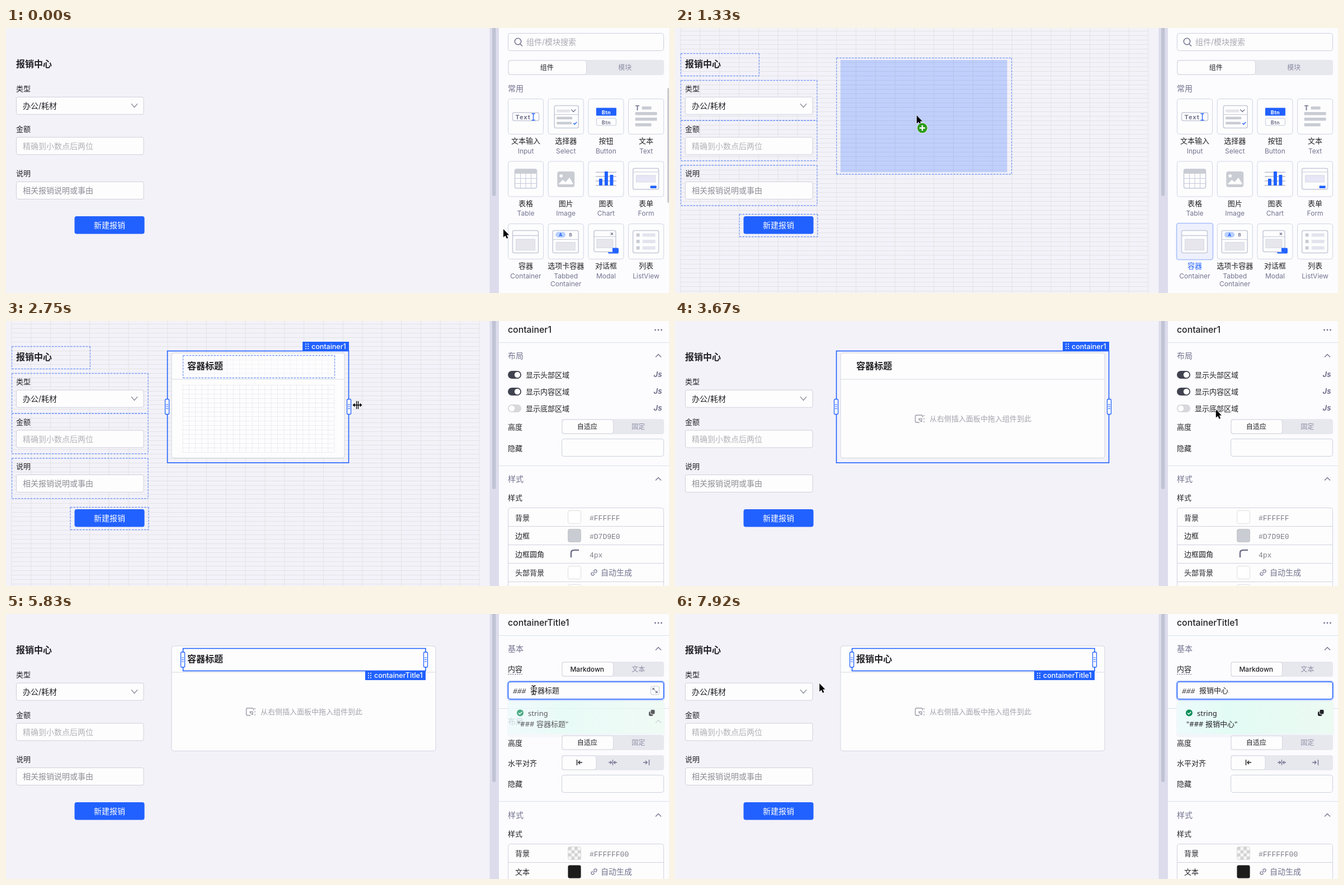
An HTML page for the animation above (8 s loop, 1185 px wide and 473 px high).

```html
<!DOCTYPE html>
<html lang="zh-CN">
<head>
<meta charset="utf-8">
<style>
html, body { margin: 0; width: 100%; height: 100%; overflow: hidden; background: #f3f2f9; }
svg { display: block; width: 1185px; height: 473px; }
text { font-family: Inter, "Noto Sans CJK SC", "Noto Sans CJK", sans-serif; white-space: pre; }
text.mono { font-family: "Liberation Mono", "Noto Sans CJK SC", "Noto Sans CJK", monospace; }
text.sans { font-family: "Noto Sans", "Noto Sans CJK SC", "Noto Sans CJK", sans-serif; }
</style>
</head>
<body>
<svg id="stage" viewBox="0 0 1185 473"></svg>
<script>
const BLUE = '#2161ff', INK = '#222226', SLATE = '#73738f', GREY = '#c9ccd3', LINE = '#d0d3de', PALE = '#e7e7ee', WHITE = '#fdfdfe';
const LOOP = 8000, STEP = 250 / 3, LEFT = 10, COL = 836 / 24, ROW = 8;

// Drawing helpers: text is placed by its vertical centre, boxes by their edges.
const text = (s, x, cy, size = 13, fill = INK, o = '') =>
  `<text x="${x}" y="${Math.round(cy + size * .35)}" font-size="${size}" fill="${fill}" ${o}>${s}</text>`;
const mid = (s, x, cy, size, fill, o = '') => text(s, x, cy, size, fill, 'text-anchor="middle" ' + o);
const box = (x, y, x2, y2, fill = 'none', stroke = 'none', r = 0, o = '') =>
  `<rect x="${x}" y="${y}" width="${x2 - x}" height="${y2 - y}" rx="${r}" fill="${fill}" stroke="${stroke}" ${o}/>`;
const path = (d, stroke, w = 1, o = '') => `<path d="${d}" fill="none" stroke="${stroke}" stroke-width="${w}" ${o}/>`;
const dot = (x, y, r, fill) => `<circle cx="${x}" cy="${y}" r="${r}" fill="${fill}"/>`;
const dashed = (x, y, x2, y2) => path(`M${x} ${y}H${x2}M${x} ${y2}H${x2}M${x} ${y}V${y2}M${x2} ${y}V${y2}`, '#7b9cf5', 1.3, 'stroke-dasharray="3.5 2"');
const solid = (x, y, x2, y2) => box(x, y, x2, y2, 'none', BLUE, 0, 'stroke-width="1.6"');
const bold = 'font-weight="700"', medium = 'font-weight="500"';

function lattice(x, y, x2, y2, dx, y0, color, o = '') {
  let d = '';
  for (let i = x; i <= x2 + .5; i += dx) d += `M${i.toFixed(1)} ${y}V${y2}`;
  for (let j = y0; j <= y2; j += ROW) d += `M${x} ${j + .5}H${x2}`;
  return path(d, color, 1, o);
}

function form() {
  const label = (s, cy) => text(s, 18, cy);
  const field = (s, y, color) => box(18.5, y, 246, y + 31, WHITE, '#cfd0d8', 3) + text(s, 30, y + 16, 14, color);
  return text('报销中心', 18, 64, 16, INK, bold) + label('类型', 108) + label('金额', 180) + label('说明', 259) +
    field('办公/耗材', 123.2, INK) + path('M224 135.200l5.500 6.500l5.500-6.500', '#777b86', 1.1) +
    field('精确到小数点后两位', 195, '#b2b2b6') + field('相关报销说明或事由', 274.5, '#8e8e96') +
    box(122.5, 336, 247.5, 367.5, BLUE, 'none', 4) + mid('新建报销', 185, 352, 14, '#fff');
}

const formOutlines = [[10.5, 45.5, 150.5, 85.5], [10.5, 93.5, 254, 165], [10.5, 165, 254, 237], [10.5, 245, 254, 317], [115, 332.5, 255, 372.5]]
  .map(b => dashed(...b)).join('');

function segments(x, x2, y, labels) {
  const w = (x2 - x) / labels.length;
  return box(x, y, x2, y + 27, PALE, 'none', 4) + box(x + 1, y + 1, x + w + 1, y + 26, WHITE, '#d5d6e0', 4) +
    labels.map((s, i) => mid(s, x + w * (i + .5), y + 13.5, 12, i ? '#8b8fa3' : INK, medium)).join('');
}

// Icons are drawn relative to the corner of a 63px tile.
const frame = (x, y, x2, y2) => box(x, y, x2, y2, WHITE, '#c5c9d8', 3, 'stroke-width="1.5"');
const bar = (x, y, x2, y2, c = GREY) => box(x, y, x2, y2, c, 'none', 1);
const icons = [
  frame(8, 24.5, 55, 39) + text('Text', 13, 32, 11, SLATE, bold + ' letter-spacing="1"') +
    path('M42 26.5h6M45 26.5V38M42 38h6', BLUE, 1.3),
  frame(11, 12, 54, 52) + bar(15, 19, 39, 24, '#e4e4ea') + path('M11 28h43', '#c5c9d8') +
    path('M41 19l4 4l4-4', SLATE, 1.3) + bar(15, 32, 43, 36.5) + bar(15, 41, 42, 45.5) + path('M45 43.5l2 2l4-4', BLUE, 1.5),
  bar(14, 16, 50, 30, BLUE) + mid('Btn', 32, 23.5, 9, '#fff', bold + ' letter-spacing=".5"') +
    box(14.5, 34.5, 49.5, 47.5, WHITE, '#c5c9d8', 2) + mid('Btn', 32, 41.5, 9, SLATE, bold + ' letter-spacing=".5"'),
  text('T', 12, 16, 12, SLATE, bold) + bar(24, 13.5, 41, 19) + bar(12, 23.5, 51, 29) + bar(12, 33.5, 51, 39) + bar(12, 43.5, 41, 49),
  frame(12, 14, 51, 48) + bar(12, 14, 51, 22) + path('M12 30.5h39M12 39.5h39M22 22v26M31.5 22v26M41 22v26', '#c5c9d8'),
  box(16, 18, 47, 46, GREY, 'none', 4) + dot(23, 26, 2.8, '#fff') + '<path d="M18 41l8-8l5 4l7-8l7 12z" fill="#fff"/>',
  path('M13 19.5h37M13 27h37M13 35h37M13 43h37', '#b9bdca', 1.3) +
    bar(19, 31, 25, 43, BLUE) + bar(29, 18, 35, 43, BLUE) + bar(38.5, 24, 44.5, 43, BLUE),
  frame(8, 12.5, 54, 50) + path('M8 19h46', '#c5c9d8') + box(14, 25, 48, 37, '#e6e6f6', '#d8dae4') + bar(39, 43.5, 50, 48, BLUE),
  frame(8, 12, 54, 52) + path('M8 21h46', '#c5c9d8', 1.5) + box(14, 27.5, 48, 47, '#e6e6ec', '#d8dae4'),
  frame(8, 12, 54, 52) + box(13, 14.5, 31, 24.5, '#b9d0fd', 'none', 5) + mid('A', 22, 19.5, 8, BLUE, bold) +
    mid('B', 40, 19.5, 8, SLATE, bold) + path('M8 28h46', '#c5c9d8') + box(14, 33, 48, 47, '#e6e6ec', '#d8dae4'),
  box(35, 43, 54, 53, BLUE, 'none', 2) + frame(10, 12, 49, 50) + path('M10 23h39', '#c5c9d8') +
    path('M40 16l4 4M44 16l-4 4', SLATE, 1.2) + box(15, 27.5, 44, 43, '#e6e6ec', '#d8dae4') + bar(43, 43, 50, 50.5, BLUE),
  frame(8, 12, 54, 52) + [17, 28.5, 40].map(y => bar(14, y, 20, y + 6) + bar(25, y, 48, y + 6, '#e4e4ef')).join('')
];
const names = ['文本输入,Input', '选择器,Select', '按钮,Button', '文本,Text', '表格,Table', '图片,Image', '图表,Chart', '表单,Form',
  '容器,Container', '选项卡容器,Tabbed|Container', '对话框,Modal', '列表,ListView'];

function library(active, thumb) {
  let s = box(897.5, 9.5, 1175.5, 40.5, WHITE, '#ccd0dd', 4) +
    '<circle cx="915" cy="24" r="5.7" fill="none" stroke="#73738f" stroke-width="1.6"/>' + path('M919 28.5l4 4', SLATE, 1.6) +
    text('组件/模块搜索', 930, 25, 14, '#a9a9b2') + segments(897, 1176, 57, ['组件', '模块']) + text('常用', 897, 108, 14, SLATE, medium);
  names.forEach((n, i) => {
    const [zh, en] = n.split(','), x = 897.5 + i % 4 * 71.7, y = 126.5 + Math.floor(i / 4) * 111.5, hot = active && i === 8;
    s += hot ? box(x - 1, y - 1, x + 64, y + 64, '#eef1fd', '#a9bff8', 4, 'stroke-width="1.6"') : box(x, y, x + 63, y + 63, WHITE, '#d0d4e4', 4);
    s += `<g transform="translate(${x} ${y})">${icons[i]}</g>` + mid(zh, x + 31.5, y + 75, 13, hot ? BLUE : INK);
    en.split('|').forEach((w, j) => s += mid(w, x + 31.5, y + 93 + j * 14, 12, SLATE));
  });
  return s + box(1182, 107, 1187, 312, '#c9c9d0', 'none', 2, `opacity="${thumb}"`);
}

const divider = y => path(`M881 ${y}H1185`, '#d9dfe9');
const section = (s, cy) => text(s, 897, cy, 14, SLATE, medium) + path(`M1161 ${cy + 2.5}l5-5l5 5`, SLATE, 1.3);
const header = s => text(s, 897, 15.5, 15.8, INK, medium) + [1160.5, 1166, 1171.5].map(x => dot(x, 16, 1.4, SLATE)).join('') + divider(38.5);
const blank = y => box(993.5, y, 1175.5, y + 31, WHITE, '#ccd0dd', 4);
const swatch = (cy, fill) => box(1004.5, cy - 11.5, 1027.5, cy + 11.5, fill, '#0000001f', 3);
const hex = (s, cy) => text(s, 1043, cy, 13, '#7c7c86', 'class="mono"');
const auto = cy => `<g transform="rotate(-45 1051 ${cy})">` + path(`M1050 ${cy - 2.5}h-2.5a2.5 2.5 0 0 0 0 5h2.5M1052 ${cy - 2.5}h2.5a2.5 2.5 0 0 1 0 5h-2.5M1048.5 ${cy}h5`, SLATE, 1.2) +
  '</g>' + text('自动生成', 1063, cy, 14, SLATE);

function toggle(s, cy, on) {
  return box(897, cy - 7, 921, cy + 7, on ? '#40434f' : '#d7d7dc', 'none', 7) + dot(on ? 914 : 904, cy, 5.2, '#fff') +
    text(s, 929, cy) + mid('Js', 1165, cy - .5, 13, SLATE, bold + ' font-style="italic"');
}

function containerPanel() {
  const rows = ['背景', '边框', '边框圆角', '头部背景'].map((s, i) => text(s, 910, 351 + i * 32.8) + path(`M897.5 ${366.5 + i * 33}H1175.5`, LINE)).join('');
  return header('container1') + section('布局', 62) + toggle('显示头部区域', 96, true) + toggle('显示内容区域', 126, true) + toggle('显示底部区域', 156, false) +
    text('高度', 897, 189) + segments(993, 1176, 175, ['自适应', '固定']) + text('隐藏', 897, 227) + blank(210.5) + divider(258.5) +
    section('样式', 282) + text('样式', 897, 315) + box(897.5, 333.5, 1175.5, 490, WHITE, LINE, 4) + rows +
    swatch(350, '#fff') + hex('#FFFFFF', 351) + swatch(383, GREY) + hex('#D7D9E0', 384) +
    path('M1010 422v-8q0-5 5-5h9', SLATE, 2.6) + hex('4px', 417) + swatch(449, '#fff') + auto(449) + swatch(482, '#fff');
}

function titlePanel() {
  let checks = '';
  for (let i = 0; i < 16; i++) if ((i + (i >> 2)) % 2 === 0) {
    const x = 1005 + i % 4 * 5.6, y = 416 + (i >> 2) * 5.6;
    checks += box(x, y, x + 5.6, y + 5.6, '#d3d3d3');
  }
  const arrows = path('M1020.5 260v10M1030 265h-7M1026 262l-3 3l3 3', INK, 1.4) +
    path('M1084.5 260v10M1077 265h5M1080 262.500l2.500 2.500l-2.500 2.500M1092 265h-5M1089 262.500l-2.500 2.500l2.500 2.500', SLATE, 1.3) +
    path('M1149.5 260v10M1139 265h7M1143 262l3 3l-3 3', SLATE, 1.4);
  return header('containerTitle1') + section('基本', 62) + text('内容', 897, 98) + path('M897 107.500H923', SLATE, 1, 'stroke-dasharray="2.500 1.500"') +
    segments(993, 1176, 85, ['Markdown', '文本']) + divider(168.5) + section('布局', 192) +
    text('高度', 897, 230) + segments(993, 1176, 216, ['自适应', '固定']) + text('水平对齐', 897, 266) + segments(993, 1176, 252, ['', '', '']) + arrows +
    text('隐藏', 897, 303) + blank(287.5) + divider(334.5) + section('样式', 359) + text('样式', 897, 392) +
    box(897.5, 410.5, 1175.5, 490, WHITE, LINE, 4) + path('M897.5 443.500H1175.5', LINE) + text('背景', 910, 427) + text('文本', 910, 460) +
    swatch(427, '#f7f7f7') + checks + hex('#FFFFFF00', 428) + swatch(460, '#1c1c1c') + auto(460);
}

function editor(value, shown, focus, selected, hover, fade) {
  let s = focus ? box(896, 119.5, 1177, 154, 'none', '#c9d7fd', 5, 'stroke-width="2"') : '';
  s += box(897.5, 121, 1175.5, 152, WHITE, focus ? BLUE : '#ccd0dd', 4, focus ? 'stroke-width="1.5"' : '');
  if (selected) s += box(937, 126, 989, 147, BLUE);
  s += text('###', 906, 137, 13, INK, 'class="mono" font-style="italic"') + text(value, 937, 136.5, 13, selected ? '#fff' : INK);
  if (hover) s += box(1152.5, 129, 1167.5, 144, WHITE, '#c4c7d4', 3) + path('M1156 136v-3.500h3.500M1156.500 133l3 3M1164 137v3.500h-3.500M1163.500 140l-3-3', SLATE, 1.1);
  if (!focus) return s;
  return s + `<g opacity="${fade}">` + box(896, 156, 1178, 220, '#dfe9ee', 'none', 6, 'opacity=".35"') +
    box(897, 155, 1177, 214, 'url(#mint)', 'none', 4) + dot(919, 176.5, 6, '#0b8f5a') + path('M916 176.500l2.300 2.300l4-4', '#fff', 1.4) +
    text('string', 933, 177, 13, INK, 'class="sans"') + box(1149, 174, 1156.5, 182, INK, 'none', 2) + box(1152, 170.5, 1160, 179, INK, '#e6f9f0', 2) +
    text(`"### ${shown}"`, 914, 196, 13, INK, 'class="sans"') + '</g>';
}

function tag(s, x, x2, y) {
  let d = '';
  for (let i = 0; i < 6; i++) d += dot(x + 6 + i % 2 * 4, y + 4.200 + (i >> 1) * 4, 1, '#fff');
  return box(x, y, x2, y + 16.5, BLUE) + d + text(s, x + 16, y + 8.2, 12.5, '#fff', medium);
}
const handle = (x, cy, h) => box(x - 3.5, cy - h, x + 3.5, cy + h, '#fff', BLUE, 2, 'stroke-width="1.3"') +
  path(`M${x - 2} ${cy - 3.5}h4M${x - 2} ${cy}h4M${x - 2} ${cy + 3.5}h4`, BLUE);

function container(x2, title, st) {
  const edge = x2 - 26, hint = (288 + x2) / 2 - 103;
  let s = box(296, 57, x2 - 8, 244.5, WHITE, '#d3d5de', 4) + path(`M296 104H${x2 - 8}`, '#d7d9e0');
  if (st.grid) {
    const dx = (edge - 316) / 24;
    s += lattice(316, 62, edge, 101, dx, 69, '#eeeef2', 'stroke-dasharray="2 1"') + lattice(316, 114, edge, 235, dx, 114, '#e5e5ea', 'stroke-dasharray="2 1"');
  }
  s += text(title, 324, 80, 16, INK, bold);
  if (!st.resizing) s += path(`M${hint + 8} 181h-5q-2.500 0-2.500-2.500v-8q0-2.500 2.500-2.500h8q2.500 0 2.500 2.500v1.500M${hint + 12} 180v-5.500h-5.500M${hint + 11.5} 180l-5-5`, '#9c9ca8', 1.4) +
    [169, 174.5, 180].map(y => dot(hint + 16, y, 1, '#9c9ca8')).join('') + text('从右侧插入面板中拖入组件到此', hint + 26, 174.5, 13, '#a3a3ad');
  if (st.boxed) s += solid(288.5, 53.5, x2 - .5, 253) + tag('container1', x2 - 83, x2, 37);
  else if (st.grid) s += dashed(288.5, 53.5, x2 - .5, 252.5);
  if (st.handles) s += handle(288, 153, 13.5) + handle(x2, 153, 13.5);
  if (st.titled) s += solid(316.5, 61.5, edge, 101.5) + tag('containerTitle1', edge - 108, edge, 101.5);
  else if (st.grid) s += dashed(316.5, 61.5, edge + .5, 101.5);
  if (st.titleHandles) s += handle(316, 81.5, 13.5) + handle(edge, 81.5, 13.5);
  return s;
}

// Pointer path: time, x, y
const route = [[0, 889, 359], [333, 922, 376], [500, 920, 376], [833, 640, 262], [1083, 500, 190], [1333, 432, 156], [1500, 432, 156],
  [2000, 606, 150], [2083, 606, 150], [2500, 624, 150], [2667, 624, 150], [2750, 628, 150], [3250, 791, 150], [3417, 791, 150],
  [3667, 967, 158], [3833, 972, 160], [4250, 706, 65], [4333, 703, 64], [4417, 693, 62], [4833, 693, 62], [5000, 821, 79],
  [5500, 936, 132], [5667, 943, 136], [6250, 943, 136], [6333, 946, 136], [7417, 946, 136], [7833, 320, 126], [7917, 258, 124], [8000, 258, 124]];
function pointer(t) {
  const i = Math.max(1, route.findIndex(p => p[0] >= t - 1)), [a, x, y] = route[i - 1], [b, u, v] = route[i];
  const f = Math.min(1, (t - a) / (b - a));
  return [x + (u - x) * f, y + (v - y) * f];
}

const beam = 'M-3.500 -8q3.500 0 3.500 2.500q0-2.500 3.500-2.500M0 -6V6M-3.500 8q3.500 0 3.500-2.500q0 2.500 3.500 2.500M-2 1.500h4';
const shapes = {
  arrow: '<path d="M0 0V14.500L3.500 11.500L5.800 16.800L8.200 15.800L6 10.600H10.200Z" fill="#000" stroke="#fff" stroke-width="1" paint-order="stroke"/>',
  resize: path('M-2 -7V7M2 -7V7M-7 0H7', '#fff', 4) + path('M-1.500 -7V7M1.500 -7V7M-6 0H6', '#000', 1.4) + '<path d="M-8.500 0l4-3.500v7zM8.500 0l-4-3.500v7z"/>',
  beam: path(beam, '#fff', 3) + path(beam, '#111', 1.3),
  badge: '<circle cx="10" cy="22.500" r="9.300" fill="#2a9a1c" stroke="#e9f3e6" stroke-width="1"/>' + path('M5 22.500h10M10 17.500v10', '#fff', 2.4)
};

function scene(t) {
  const on = (a, b) => t >= a - 5 && t < b - 5;
  const [x, y] = pointer(t), dragging = on(500, 1417), resizing = on(2167, 3333);
  const grid = dragging || resizing || on(6833, 7250), picked = t >= 4745;
  const overField = picked && x > 897 && x < 1176 && y > 121 && y < 152;
  let s = grid ? lattice(LEFT, 0, 846, 473, COL, 5, '#e3e3e4') + formOutlines : '';
  s += form();

  if (dragging && x < 846) {
    const col = Math.min(15, Math.round((x - 156 - LEFT) / COL)), row = Math.round((y - 104 - 5.5) / ROW);
    const gx = LEFT + col * COL, gy = 5.5 + row * ROW;
    s += box(gx + 7, gy + 3.5, gx + 305, gy + 204, BLUE, 'none', 0, 'opacity=".24"') + dashed(gx, gy, gx + 313, gy + 207.5);
  }
  if (t >= 1412) {
    const right = t >= 3328 ? 776 : resizing ? Math.max(601, x - 15) : 601;
    const crossing = t > 7490 && x > 288 && x < 776;
    s += container(right, t >= 7078 ? '报销中心' : '容器标题', {
      grid, resizing, handles: !picked, titleHandles: picked, titled: t >= 4245,
      boxed: !picked || on(4917, 5083) || crossing
    });
  }

  s += box(864.5, 0, 881, 473, '#dcdcec') + box(869, -5, 875.5, 300, '#c0c3d3', 'none', 3) + box(881, 0, 1185, 473, '#fcfcff');
  if (t < 1412) s += library(t > 325, Math.max(0, Math.min(1, (1167 - t) / 330)));
  else if (!picked) s += containerPanel();
  else s += titlePanel() + editor(t >= 6995 ? '报销中心' : '容器标题', t >= 7078 ? '报销中心' : '容器标题',
    t >= 5745, on(6083, 7000), overField, Math.min(1, (t - 5650) / 250));

  const kind = on(2000, 3417) ? 'resize' : overField ? 'beam' : 'arrow';
  return s + `<g transform="translate(${x.toFixed(1)} ${y.toFixed(1)})">${shapes[kind]}${dragging && x < 846 ? shapes.badge : ''}</g>`;
}

const stage = document.getElementById('stage');
const defs = '<defs><linearGradient id="mint"><stop stop-color="#edfafb"/><stop offset=".35" stop-color="#e2fbf4"/><stop offset="1" stop-color="#ecfaf2"/></linearGradient></defs>';
const start = performance.now();
let last = -1;
function render(now) {
  const step = Math.floor((Math.max(0, now - start) % LOOP + 4) / STEP) % 96;
  if (step !== last) {
    last = step;
    stage.innerHTML = defs + scene(step * STEP);
  }
  requestAnimationFrame(render);
}
render(start);
</script>
</body>
</html>
```
